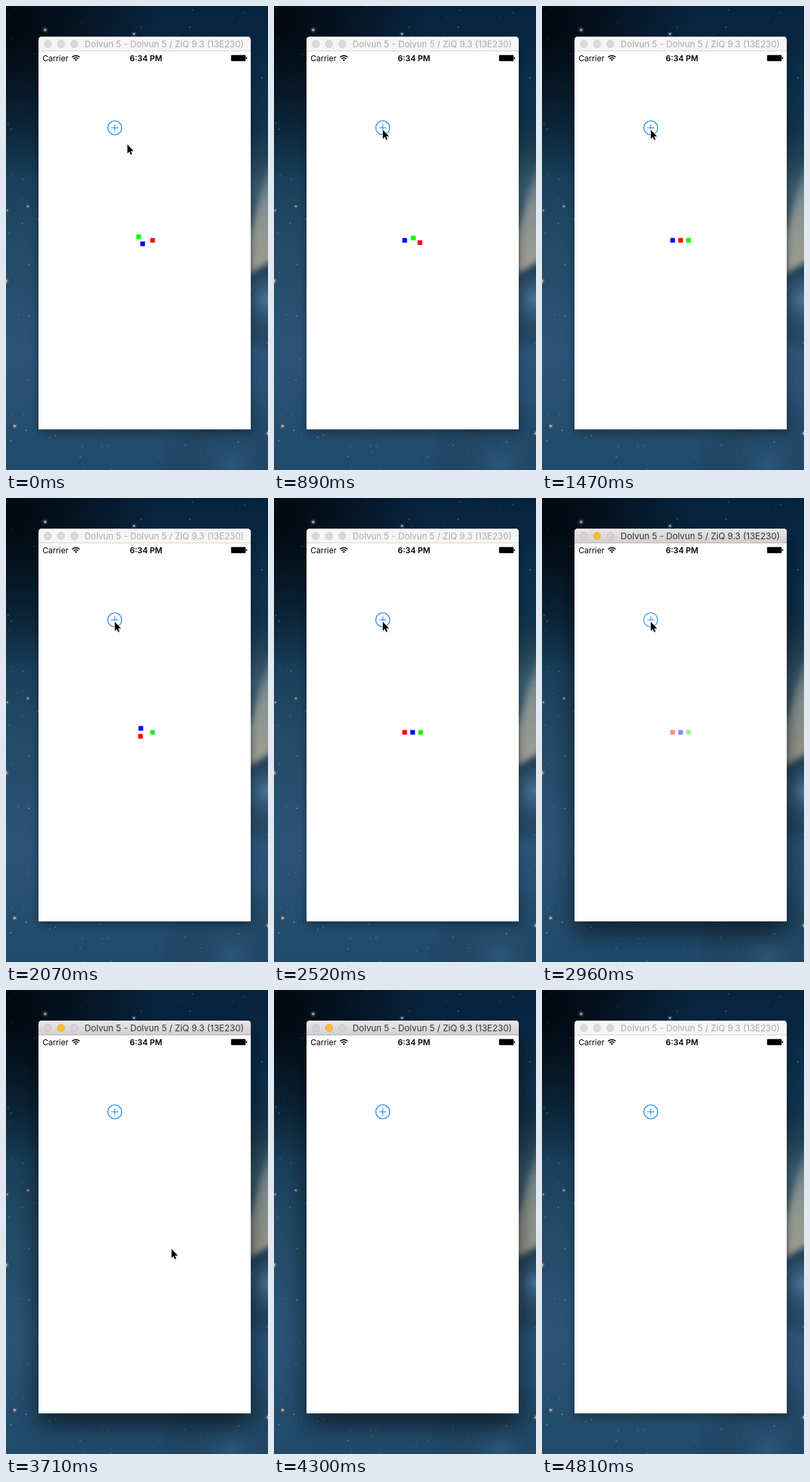
These frames come from a looping animation (395 px wide and 697 px high, 4.84 s). An HTML page with a canvas:

```html
<!DOCTYPE html>
<html lang="en">
<head>
<meta charset="utf-8">
<title>Swapping dots</title>
<style>
  html, body { margin: 0; width: 100%; height: 100%; overflow: hidden; background: #163a58; }
  #sky, #scene { position: absolute; left: 0; top: 0; width: 395px; height: 697px; }
  #window {
    position: absolute; left: 49px; top: 46px; width: 320px; height: 590px;
    border-radius: 5px 5px 0 0; background: #fff;
    box-shadow: 0 5px 14px rgba(0, 0, 0, .35);
  }
  #bar {
    box-sizing: border-box; height: 22px; border-radius: 5px 5px 0 0;
    background: #f6f6f6; border-bottom: 1px solid #d3d3d3;
  }
  .active #window { box-shadow: 0 17px 36px rgba(0, 0, 0, .6); }
  .active #bar {
    background: linear-gradient(#ebe6ea, #d2cfd2); border-bottom-color: #b4b1b4;
    box-shadow: inset 0 1px #f5f2f5;
  }
  text { font-family: Inter, Roboto, sans-serif; }
  #lights circle { fill: #d9d9d9; stroke: #d0d0d0; }
  #title { font-size: 13.2px; fill: #aaa; }
  .active #lights circle { fill: #d5d1d5; stroke: #c3bfc3; }
  .active #lights circle:nth-child(2) { fill: #fdbd31; stroke: #eeae2c; }
  .active #title { fill: #353335; }
</style>
</head>
<body>
<canvas id="sky" width="395" height="697"></canvas>
<div id="stage">
  <div id="window"><div id="bar"></div></div>
  <svg id="scene" viewBox="0 0 395 697">
    <g id="lights">
      <circle cx="63" cy="57" r="5.5"/>
      <circle cx="83" cy="57" r="5.5"/>
      <circle cx="103" cy="57" r="5.5"/>
    </g>
    <text id="title" x="238.5" y="62" text-anchor="middle">Dolvun 5 - Dolvun 5 / ZiQ 9.3 (13E230)</text>
    <text x="55" y="82.5" font-size="12">Carrier</text>
    <text x="211" y="82.5" font-size="12" font-weight="600" text-anchor="middle">6:34 PM</text>
    <g fill="none" stroke="#000" stroke-width="1.7">
      <path d="M99.6 77a8 8 0 0 1 11.4 0M101.8 79.4a5 5 0 0 1 7 0"/>
      <path d="M105.3 82.8l-1.9-2a2.8 2.8 0 0 1 3.8 0z" fill="#000" stroke="none"/>
    </g>
    <rect x="339" y="73.5" width="22.5" height="9.5" rx="1.4" fill="#555"/>
    <rect x="340" y="74" width="21" height="8.5" rx=".8"/>
    <path d="M362 76.5q1.6.3 1.6 1.7t-1.6 1.7z"/>
    <g id="button" fill="none" stroke="#007aff">
      <circle cx="164" cy="183" r="10.5" stroke-width="1.1"/>
      <path d="M158.5 183h11M164 177.5v11"/>
    </g>
    <g id="dots"></g>
    <g id="cursor">
      <path d="M0 0V13.5L3 10.6L5 15.2L7.1 14.3L5.1 9.8H9.4Z" opacity=".25" transform="translate(.5 1.6)"/>
      <path d="M0 0V13.5L3 10.6L5 15.2L7.1 14.3L5.1 9.8H9.4Z" stroke="#fff" stroke-width="1.6" paint-order="stroke"/>
    </g>
  </svg>
</div>
<script>
const byId = id => document.getElementById(id);
const clamp = p => Math.min(1, Math.max(0, p));
const mix = (a, b, p) => a + (b - a) * p;
const easeOut = p => 1 - (1 - p) ** 3;
const easeInOut = p => (1 - Math.cos(Math.PI * p)) / 2;

const LOOP = 4840, STEP = 148, LEAD = 12;
const ACTIVATE = 18 * STEP, PRESS = 19 * STEP, DEACTIVATE = 4810;

const COLORS = ['#0f0', '#00f', '#f00'];
const ROW = { x: 197, y: 352, gap: 12 }, DOT = 7, RADIUS = ROW.gap / 2;
const SWAP_STARTS = [-274, 687, 1715], SWAP_TIME = 700;

function drawSky() {
  const c = byId('sky').getContext('2d');
  const paint = (gradient, colors) => {
    colors.forEach((color, i) => gradient.addColorStop(i / (colors.length - 1), color));
    c.fillStyle = gradient;
  };
  const glow = (x, y, r, color) => {
    paint(c.createRadialGradient(x, y, 0, x, y, r), [color, 'transparent']);
    c.fillRect(x - r, y - r, 2 * r, 2 * r);
  };

  paint(c.createLinearGradient(0, 0, 0, 697), ['#07223d', '#103450', '#224a65', '#2b5476', '#204a6a']);
  c.fillRect(0, 0, 395, 697);
  glow(0, 30, 230, 'rgba(1,5,9,.9)');
  glow(395, 290, 150, 'rgba(105,135,150,.6)');
  glow(395, 440, 80, 'rgba(85,130,168,.75)');
  glow(340, 690, 110, 'rgba(60,105,140,.4)');

  // beam of light behind the window's right edge
  c.save();
  c.filter = 'blur(5px)';
  paint(c.createLinearGradient(0, 215, 0, 400), ['rgba(110,132,142,.2)', '#87918f', '#a09f93']);
  c.beginPath();
  c.moveTo(405, 215);
  c.lineTo(366, 345);
  c.lineTo(366, 403);
  c.lineTo(405, 380);
  c.fill();
  c.restore();

  let seed = 71;
  const random = () => (seed = seed * 16807 % 2147483647) / 2147483647;
  for (let i = 0; i < 420; i++) {
    c.fillStyle = `rgba(165,205,235,${.15 + .6 * random() ** 2})`;
    c.beginPath();
    c.arc(395 * random(), 697 * random(), .45 + .5 * random(), 0, 7);
    c.fill();
  }
  const brightStars = [[0, 413], [395, 642], [13, 631], [59, 36], [193, 42], [33, 301], [2, 307]];
  brightStars.forEach(([x, y], i) => {
    const r = 6 - i / 2;
    glow(x, y, r * 1.5, 'rgba(190,215,235,.6)');
    glow(x, y, r * .8, '#fff');
  });
}

const dots = Object.fromEntries(COLORS.map(color => {
  const dot = document.createElementNS('http://www.w3.org/2000/svg', 'rect');
  dot.setAttribute('width', DOT);
  dot.setAttribute('height', DOT);
  dot.setAttribute('fill', color);
  byId('dots').append(dot);
  return [color, dot];
}));

function place(color, x, y) {
  dots[color].setAttribute('x', x - DOT / 2);
  dots[color].setAttribute('y', y - DOT / 2);
}

// Swaps alternate between the left and right pair, turning clockwise about its midpoint.
function drawDots(t) {
  const order = [...COLORS];
  order.forEach((color, i) => place(color, ROW.x + i * ROW.gap, ROW.y));
  SWAP_STARTS.forEach((start, k) => {
    if (t <= start) return;
    const left = k % 2, right = left + 1;
    const angle = Math.PI * easeInOut(clamp((t - start) / SWAP_TIME));
    const dx = RADIUS * Math.cos(angle), dy = RADIUS * Math.sin(angle);
    const mid = ROW.x + left * ROW.gap + RADIUS;
    place(order[left], mid - dx, ROW.y - dy);
    place(order[right], mid + dx, ROW.y + dy);
    [order[left], order[right]] = [order[right], order[left]];
  });
  byId('dots').style.opacity = clamp(1 - (t - PRESS) / 270);
}

function drawCursor(t) {
  const arrive = easeOut(clamp(t / 300));
  const leave = easeInOut(clamp((t - 3260) / 1040));
  const x = mix(mix(183, 164, arrive), 389, leave);
  const y = mix(mix(208, 186, arrive), 720, leave);
  byId('cursor').setAttribute('transform', `translate(${x} ${y})`);
}

function render(now) {
  const time = now % LOOP;
  const t = Math.floor((time + LEAD) / STEP) * STEP; // the screen refreshes once per step
  drawDots(t);
  drawCursor(t);
  byId('button').style.opacity = t < PRESS ? 1 : clamp(.25 + (t - PRESS) / 235);
  byId('stage').className = t >= ACTIVATE && time < DEACTIVATE ? 'active' : '';
}

drawSky();
const began = performance.now();
(function frame() {
  render(performance.now() - began);
  requestAnimationFrame(frame);
})();
</script>
</body>
</html>
```
